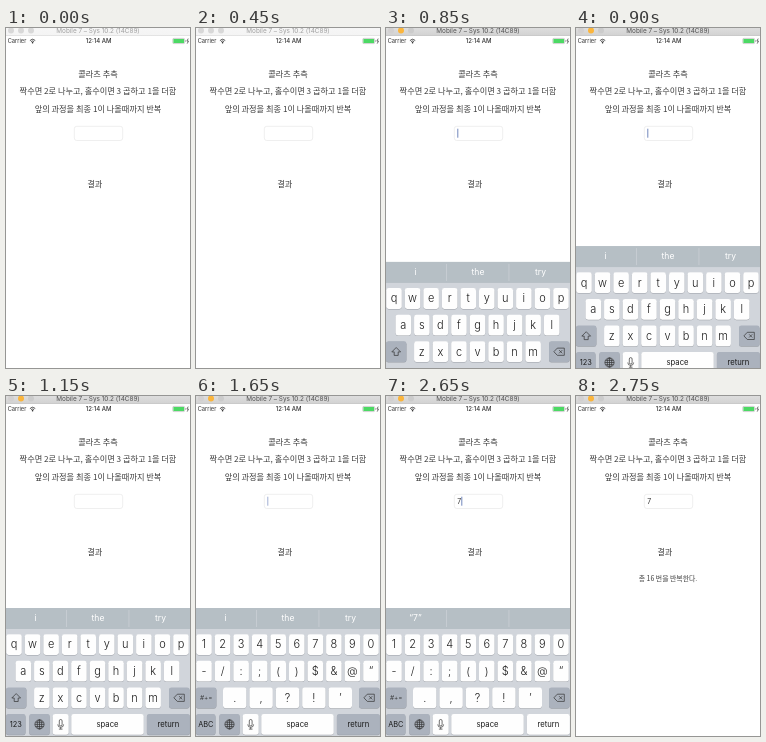
Animation, 184 px wide and 340 px high, one loop 4.05 s. Source, as an HTML page with a canvas:

```html
<!DOCTYPE html>
<html lang="ko">
<head>
<meta charset="utf-8">
<style>
html, body { margin: 0; width: 100%; height: 100%; overflow: hidden; background: #fff; }
canvas { display: block; width: 184px; height: 340px; }
</style>
</head>
<body>
<canvas id="stage"></canvas>
<script>
const W = 184, H = 340, LOOP = 4050, STEP = 50;
const LATIN = 'Inter, Roboto, sans-serif';
const KOREAN = '"Noto Sans CJK KR", "Noto Sans CJK", sans-serif';
const KEYBOARD_TOP = 212;
const KEYS_CENTER = 91.5, PITCH = 18.55, ROW_PITCH = 26.6, FIRST_ROW = 36.6;

const canvas = document.getElementById('stage');
const ctx = canvas.getContext('2d');
const scale = window.devicePixelRatio || 1;
canvas.width = W * scale;
canvas.height = H * scale;

const ramp = (t, from, to) => Math.min(1, Math.max(0, (t - from) / (to - from)));

// Critically damped spring, 0 to 1
function spring(ms) {
  const x = Math.max(0, ms) * 0.032;
  return 1 - (1 + x) * Math.exp(-x);
}

function caretAlpha(t) {
  if (t < 800 || t >= 2700) return 0;
  if (t < 1850) return 1 - ramp(t, 1000, 1150) + ramp(t, 1300, 1450) - ramp(t, 1600, 1750);
  return 1 - ramp(t, 2150, 2300) + ramp(t, 2400, 2550);
}

function text(str, x, baseline, size, { color = '#333', font = LATIN, weight = 400, align = 'center' } = {}) {
  ctx.font = `${weight} ${size}px ${font}`;
  ctx.textAlign = align;
  ctx.fillStyle = color;
  ctx.fillText(str, x, baseline);
}

const korean = (str, x, y, size = 8.2) =>
  text(str, x, y + size * 0.35, size, { font: KOREAN, weight: 300, color: '#3c3c3c' });

function rect(x, y, w, h, color) {
  ctx.fillStyle = color;
  ctx.fillRect(x, y, w, h);
}

function rounded(x, y, w, h, r) {
  ctx.beginPath();
  ctx.roundRect(x, y, w, h, r);
}

function disc(x, y, r, color) {
  ctx.fillStyle = color;
  ctx.beginPath();
  ctx.arc(x, y, r, 0, Math.PI * 2);
  ctx.fill();
}

function polyline(points, closed) {
  ctx.beginPath();
  points.forEach(([x, y]) => ctx.lineTo(x, y));
  if (closed) ctx.closePath();
  ctx.stroke();
}

function titleBar(active) {
  const fill = ctx.createLinearGradient(0, 0, 0, 7.5);
  fill.addColorStop(0, active ? '#dddddd' : '#f6f6f6');
  fill.addColorStop(1, active ? '#d2d2d2' : '#f4f4f4');
  rect(0, 0, W, 7.5, fill);
  rect(0, 7.2, W, 0.6, active ? '#b8b8b8' : '#d6d6d6');
  const lights = active ? ['#d2d0d0', '#fbb53c', '#cbcbcb'] : ['#d8d8d8', '#d8d8d8', '#d8d8d8'];
  lights.forEach((color, i) => disc(5 + i * 10, 2.4, 3, color));
  text('Mobile 7 – Sys 10.2 (14C89)', 92, 4.9, 6.4, { color: active ? '#505050' : '#a0a0a0' });
}

function statusBar() {
  text('Carrier', 1.7, 15.2, 5.7, { align: 'left' });
  ctx.strokeStyle = '#222';
  ctx.lineWidth = 0.8;
  for (const r of [1.9, 3.6]) {
    ctx.beginPath();
    ctx.arc(26.6, 15, r, -Math.PI * 0.77, -Math.PI * 0.23);
    ctx.stroke();
  }
  disc(26.6, 14.7, 0.8, '#222');
  text('12:14 AM', 92.7, 15.2, 6, { weight: 500 });
  ctx.lineWidth = 0.4;
  ctx.strokeStyle = '#888';
  rounded(166.8, 10.4, 11.8, 5.2, 1);
  ctx.stroke();
  rect(167.4, 11, 10.6, 4, '#4cd964');
  rect(179, 12.2, 0.6, 1.6, '#888');
  ctx.lineWidth = 0.7;
  ctx.strokeStyle = '#333';
  polyline([[182.2, 10.6], [180.9, 13.1], [182.5, 13.1], [181.2, 15.6]]);
}

function page(t) {
  korean('콜라츠 추측', 92, 46);
  korean('짝수면 2로 나누고, 홀수이면 3 곱하고 1을 더함', 92, 63.5);
  korean('앞의 과정을 최종 1이 나올때까지 반복', 92, 81);
  ctx.strokeStyle = '#e4e4e4';
  ctx.lineWidth = 0.6;
  rounded(68.3, 98.3, 48.4, 14.2, 2.5);
  ctx.stroke();
  const typed = t >= 1850;
  if (typed) text('7', 71.3, 107.8, 6.9, { align: 'left' });
  ctx.globalAlpha = caretAlpha(t);
  rect(typed ? 75.3 : 71.3, 100.7, 1, 9, '#7288bd');
  ctx.globalAlpha = 1;
  korean('결과', 88.8, 156.3);
  if (t >= 2700) korean('총 16 번을 반복한다.', 92, 182.5, 6.9);
}

function key(cx, cy, w, label, { size = 11, gray = false, drop = size * 0.35, weight = 300 } = {}) {
  const x = cx - w / 2, y = cy - 10.4;
  ctx.fillStyle = '#9a9ea5';
  rounded(x, y + 0.5, w, 20.8, 2.4);
  ctx.fill();
  ctx.fillStyle = gray ? '#abb2bd' : '#fefefe';
  rounded(x, y, w, 20.8, 2.4);
  ctx.fill();
  if (label) text(label, cx, cy + drop, size, { color: '#1c1c1c', weight });
}

function keyRow(labels, cy, pitch = PITCH) {
  [...labels].forEach((label, i) =>
    key(KEYS_CENTER + (i - (labels.length - 1) / 2) * pitch, cy, pitch - 3, label));
}

function icon(cx, cy, draw) {
  ctx.save();
  ctx.translate(cx, cy);
  ctx.strokeStyle = ctx.fillStyle = '#333';
  ctx.lineWidth = 0.7;
  draw();
  ctx.restore();
}

function shiftIcon() {
  polyline([[0, -4.2], [4.4, 0.2], [2, 0.2], [2, 3.7], [-2, 3.7], [-2, 0.2], [-4.4, 0.2]], true);
}

function deleteIcon() {
  polyline([[-5.4, 0], [-2, -3.6], [5, -3.6], [5, 3.6], [-2, 3.6]], true);
  polyline([[-0.2, -1.6], [3, 1.6]]);
  polyline([[3, -1.6], [-0.2, 1.6]]);
}

function globeIcon() {
  for (const rx of [4.6, 2.2]) {
    ctx.beginPath();
    ctx.ellipse(0, 0, rx, 4.6, 0, 0, Math.PI * 2);
    ctx.stroke();
  }
  polyline([[0, -4.6], [0, 4.6]]);
  for (const [y, x] of [[-2.1, 4], [0, 4.6], [2.1, 4]]) polyline([[-x, y], [x, y]]);
}

function micIcon() {
  rounded(-1.4, -4.9, 2.8, 6.4, 1.4);
  ctx.stroke();
  ctx.beginPath();
  ctx.arc(0, 0, 2.9, 0, Math.PI);
  ctx.stroke();
  polyline([[0, 2.9], [0, 4.7]]);
  polyline([[-1.8, 4.7], [1.8, 4.7]]);
}

function keyboard(top, t) {
  const [row1, row2, row3, row4] = [0, 1, 2, 3].map(i => FIRST_ROW + i * ROW_PITCH);
  const numeric = t >= 1400;
  ctx.save();
  ctx.translate(0, top);
  rect(0, 0, W, 128, '#d1d5db');
  rect(0, 0, W, 21, '#b6bfc5');
  for (const x of [60.3, 122.6]) rect(x, 2, 0.7, 17, '#cdd2d7');
  const hints = t >= 1850 ? ['“7”', '', ''] : ['i', 'the', 'try'];
  hints.forEach((hint, i) => text(hint, 29.5 + i * 62.5, 13.2, 8.6, { color: '#fff' }));

  keyRow(numeric ? '1234567890' : 'qwertyuiop', row1);
  keyRow(numeric ? '-/:;()$&@“' : 'asdfghjkl', row2);
  if (numeric) keyRow('.,?!’', row3, 26.4);
  else keyRow('zxcvbnm', row3);

  const word = { size: 7.7, drop: 2.4, weight: 400 };
  key(10.2, row3, 20.5, numeric ? '#+=' : '', { size: 6.5, gray: true });
  if (!numeric) icon(10.2, row3, shiftIcon);
  key(173.3, row3, 20.5, '', { gray: true });
  icon(173.3, row3, deleteIcon);

  key(9.8, row4, 19.5, numeric ? 'ABC' : '123', { size: 7.4, gray: true, weight: 400 });
  key(33.5, row4, 20.5, '', { gray: true });
  icon(33.5, row4, globeIcon);
  key(54.7, row4, 16, '');
  icon(54.7, row4, micIcon);
  key(101.5, row4, 72.5, 'space', word);
  key(162.4, row4, 43, 'return', { ...word, gray: t < 2600 });
  ctx.restore();
}

function draw(t) {
  ctx.setTransform(scale, 0, 0, scale, 0, 0);
  rect(0, 0, W, H, '#fff');
  titleBar(t >= 650);
  statusBar();
  page(t);
  if (t > 750 && t < 2750) {
    const shown = spring(t - 750) - spring(t - 2650);
    keyboard(H - (H - KEYBOARD_TOP) * shown, t);
  }
}

function tick() {
  const t = performance.now() % LOOP;
  draw(Math.floor(t / STEP) * STEP);
  requestAnimationFrame(tick);
}
tick();
</script>
</body>
</html>
```
